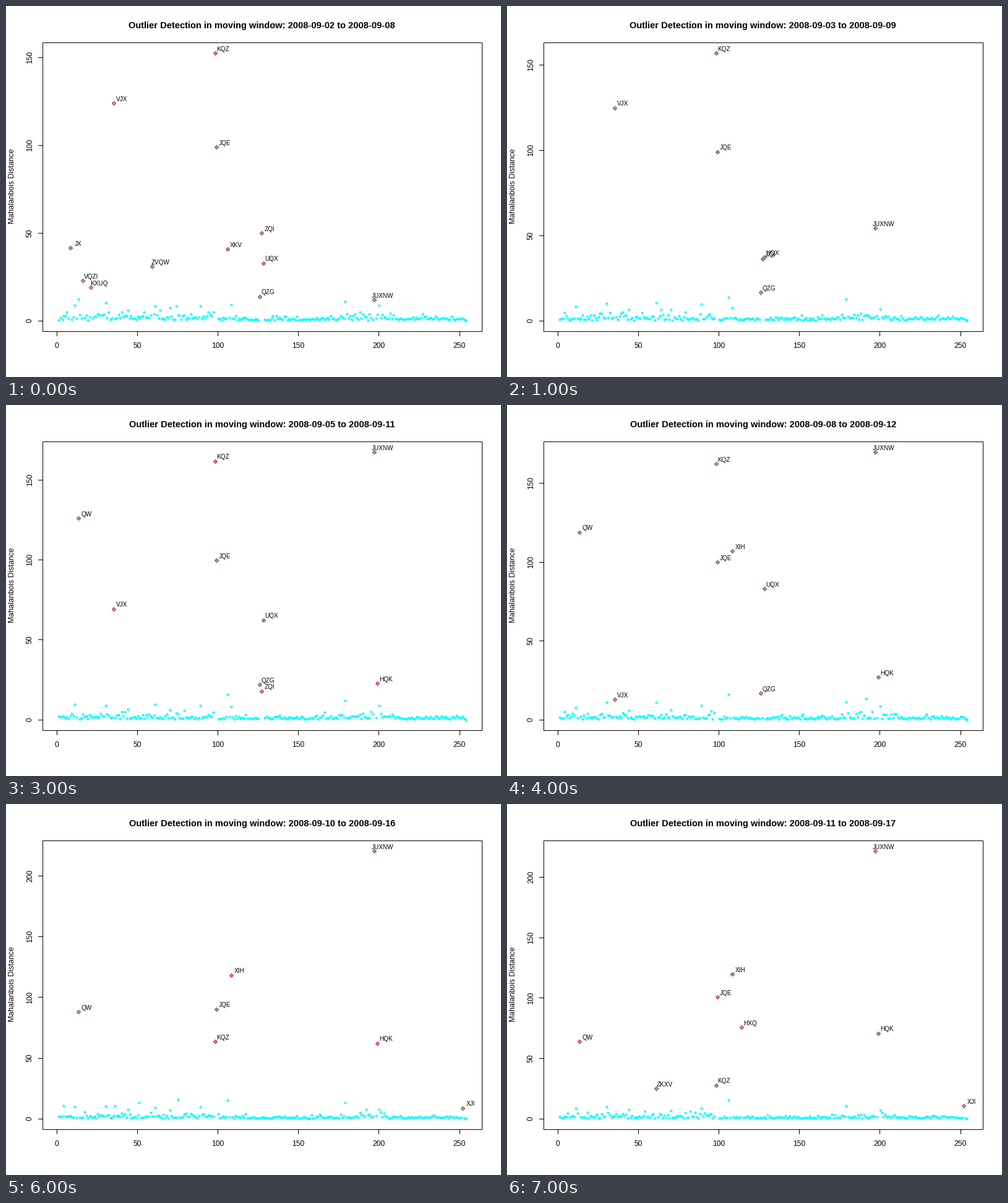
A matplotlib script that plays this animation: 800 px wide and 600 px high, repeating every 8 s.

```python
import matplotlib.pyplot as plt
import numpy as np
from matplotlib.animation import ArtistAnimation
from matplotlib.patches import Rectangle

W, H, DPI = 800, 600, 100
PX = 72 / DPI  # one pixel in points
LEFT, RIGHT, TOP, BOTTOM = 59.04, 769.76, 59.04, 526.56
COUNT, SPAN = 254, 5

plt.rcParams["font.family"] = "Liberation Sans"

# Trading days of September 2008, without the weekends
DAYS = [d for d in range(2, 18) if d % 7 not in (6, 0)]
WINDOWS = list(zip(DAYS, DAYS[SPAN - 1:]))

# Flagged stocks: index, then (window, distance) where the course turns
OUTLIERS = {
    "KQZ": (98, (0, 152.5), (2, 161.6), (4, 162.2), (5, 99.7), (7, 28)),
    "VJX": (35, (0, 124), (2, 126), (4, 13), (5, 29)),
    "JQE": (99, (0, 99), (4, 100), (5, 80), (7, 101)),
    "JX": (8, (0, 41.5)),
    "VQZI": (16, (0, 23)),
    "KXUQ": (21, (0, 19)),
    "ZVQW": (59, (0, 31)),
    "XKV": (106, (0, 41)),
    "ZQI": (127, (0, 50), (2, 23), (3, 18)),
    "UQX": (128, (0, 33), (2, 42), (4, 83), (5, 43)),
    "QZG": (126, (0, 14), (3, 22), (4, 17)),
    "JUXNW": (197, (0, 12), (2, 97), (3, 167.4), (4, 169.6), (5, 219.2),
              (7, 221.7)),
    "QW": (13, (2, 100), (3, 126), (5, 112), (7, 64)),
    "HQK": (199, (3, 23), (4, 27), (5, 54), (7, 71)),
    "XIH": (108, (4, 107), (5, 117), (7, 120)),
    "XJI": (252, (5, 7), (7, 11)),
    "HXQ": (114, (7, 76)),
    "ZKXV": (61, (7, 25)),
}

# Stocks that stay above the crowd without being flagged
RESTLESS = {11: 9, 30: 10, 44: 7, 61: 10, 70: 7, 89: 9, 106: 15, 108: 8,
            179: 12, 200: 8}

index = np.arange(1, COUNT + 1)
busy = (index < 100) | (abs(index - 192) < 18)
spread = np.where(busy, 1.4, 0.85)
habit = np.random.default_rng(8).gamma(1.3, 1, COUNT)


def to_x(i):
    pad = (RIGHT - LEFT) * 0.04 / 1.08
    return LEFT + pad + (i - 1) * (RIGHT - LEFT - 2 * pad) / (COUNT - 1)


def to_y(v, top):
    pad = (BOTTOM - TOP) * 0.04 / 1.08
    return BOTTOM - pad - v * (BOTTOM - TOP - 2 * pad) / top


def distances(day):
    """All distances of one window and the flagged ones as (name, i)."""
    rng = np.random.default_rng(100 + day)
    noise = rng.gamma(1.3, 1, COUNT)
    dist = np.minimum(0.25 + spread * (0.4 * habit + 0.6 * noise), 5)
    jumps = busy & (rng.random(COUNT) < 0.06)
    dist += jumps * rng.exponential(3.5, COUNT)
    dist[-2:] = 0.7, 0.1
    for i, level in RESTLESS.items():
        dist[i - 1] = level * rng.uniform(0.85, 1.15)
    flagged = []
    for name, (i, *turns) in OUTLIERS.items():
        times, values = zip(*turns)
        if times[0] <= day <= times[-1]:
            dist[i - 1] = np.interp(day, times, values)
            flagged.append((name, i))
    return dist, flagged


fig = plt.figure(figsize=(W / DPI, H / DPI), dpi=DPI, facecolor="white")
ax = fig.add_axes([0, 0, 1, 1])
ax.set(xlim=(0, W), ylim=(H, 0))
ax.axis("off")


def label(x, y, text, size, **style):
    return ax.text(x, y, text, fontsize=size * PX, ha="center", va="baseline",
                   rotation_mode="anchor", **style)


def mid(v):
    """Centre of the pixel that holds v, for crisp lines."""
    return np.floor(v) + 0.5


def tick(xs, ys):
    return ax.plot(xs, ys, color="black", lw=PX, solid_capstyle="butt",
                   snap=False)[0]


def scene(day):
    dist, flagged = distances(day)
    top = dist.max()
    start, end = WINDOWS[day]
    title = ("Outlier Detection in moving window: "
             f"2008-09-{start:02d} to 2008-09-{end:02d}")
    parts = [label(413.7, 36, title, 14.6, weight="bold")]
    for value in range(0, int(top) + 1, 50):
        y = to_y(value, top)
        parts.append(tick([52, 59], [mid(y)] * 2))
        parts.append(label(42, y - 0.5, str(value), 12, rotation=90))
    parts += ax.plot(to_x(index), to_y(dist, top), "o", color="cyan",
                     ms=4 * PX, mew=0)
    spots = np.array([i for _, i in flagged])
    parts += ax.plot(to_x(spots), to_y(dist[spots - 1], top), "D", mfc="cyan",
                     mec="red", ms=4.2 * PX, mew=PX)
    for name, i in flagged:
        parts.append(label(to_x(i) + 13.2, to_y(dist[i - 1], top) - 3.2,
                           name, 10))
    return parts


x0, y0, x1, y1 = mid(LEFT), mid(TOP), mid(RIGHT), mid(BOTTOM)
ax.add_patch(Rectangle((x0, y0), x1 - x0, y1 - y0, fill=False, ec="black",
                       lw=PX, snap=False))
label(13, 291.5, "Mahalanbois Distance", 12.3, rotation=90)
for value in range(0, 251, 50):
    tick([mid(to_x(value))] * 2, [527, 534])
    label(to_x(value) - 0.6, 553, str(value), 12)

anim = ArtistAnimation(fig, [scene(day) for day in range(len(WINDOWS))],
                       interval=1000, repeat=True, repeat_delay=0)
plt.show()
```
